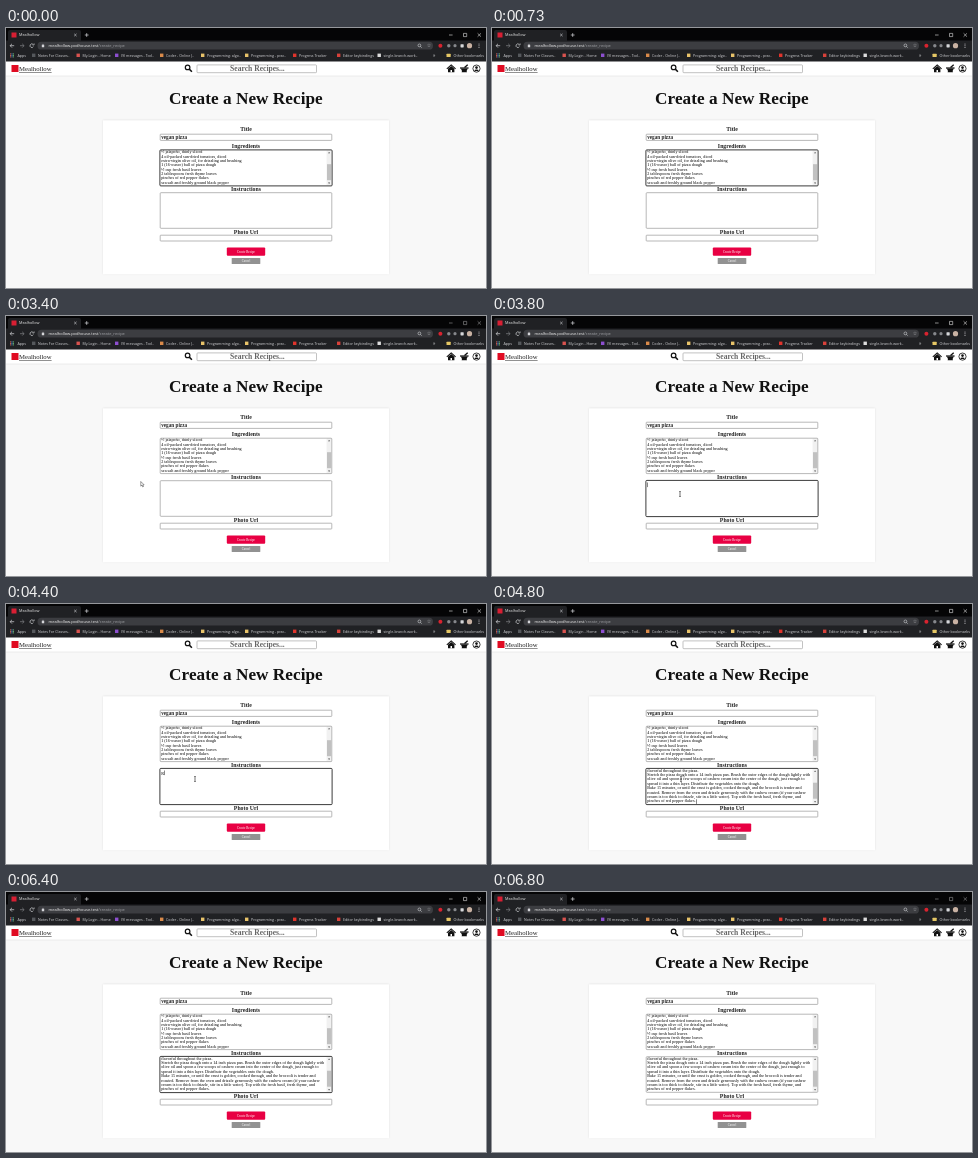
An HTML page with a canvas that plays this animation: 480x260 px, repeating every 8 s.

```html
<!DOCTYPE html>
<html lang="en">
<head>
<meta charset="utf-8">
<title>Mealhollow</title>
<style>
html, body { margin: 0; width: 100%; height: 100%; overflow: hidden; background: #f8f8f8; }
canvas { display: block; width: 480px; height: 260px; }
</style>
</head>
<body>
<canvas id="stage" width="480" height="260"></canvas>
<script>
const ctx = document.getElementById('stage').getContext('2d');
const LOOP = 8000;
const SERIF = '"Liberation Serif", serif';
const SANS = '"Open Sans", sans-serif';
const LINE = 4.38;

const ingredients = [
  '½ jalapeño, thinly sliced',
  '4 oil-packed sun-dried tomatoes, diced',
  'extra-virgin olive oil, for drizzling and brushing',
  '1 (16-ounce) ball of pizza dough',
  '½ cup fresh basil leaves',
  '2 tablespoons fresh thyme leaves',
  'pinches of red pepper flakes',
  'sea salt and freshly ground black pepper'
];
const instructions = [
  'flavorful throughout the pizza.',
  'Stretch the pizza dough onto a 14 inch pizza pan. Brush the outer edges of the dough lightly with',
  'olive oil and spoon a few scoops of cashew cream into the center of the dough, just enough to',
  'spread it into a thin layer. Distribute the vegetables onto the dough.',
  'Bake 15 minutes, or until the crust is golden, cooked through, and the broccoli is tender and',
  'roasted. Remove from the oven and drizzle generously with the cashew cream (if your cashew',
  'cream is too thick to drizzle, stir in a little water). Top with the fresh basil, fresh thyme, and',
  'pinches of red pepper flakes.'
];
const bookmarks = [
  [32, 'Notes For Classes..', '#55585c'], [76.5, 'My.Login - Home', '#d9534f'],
  [115, '(9) messages - Tod..', '#8d4fd0'], [160, 'Coder - Online J..', '#d98a4a'],
  [201, 'Programming: algo..', '#e8c36a'], [245, 'Programming - prac..', '#e8c36a'],
  [293, 'Progress Tracker', '#e0342c'], [337, 'Editor keybindings', '#d8413a'],
  [377.5, 'single-branch-work..', '#dddddd']
];

// Pointer positions hold until the next entry: time, shape, x, y.
const pointer = [
  [0, ''], [70, 'arrow', 330, 221], [130, 'arrow', 460, 19], [200, ''],
  [3400, 'arrow', 134.8, 165.5], [3470, 'arrow', 146, 179], [3530, 'beam', 163, 192],
  [3600, 'beam', 176, 196], [3730, 'beam', 184, 186], [3800, 'beam', 188, 178],
  [3870, 'beam', 189, 175], [5200, 'beam', 198, 180], [5270, 'beam', 207, 185],
  [5330, 'beam', 196, 186], [5400, 'beam', 168, 180], [5470, 'arrow', 130.8, 176.8],
  [5530, 'arrow', 10, 205], [5600, '']
];

const within = (t, ...spans) => spans.some(([a, b]) => t >= a && t < b);

function rect(x, y, w, h, color) {
  ctx.fillStyle = color;
  ctx.fillRect(x, y, w, h);
}

function box(x, y, w, h, r, fill, stroke, width = 0.5) {
  ctx.beginPath();
  ctx.roundRect(x, y, w, h, r);
  if (fill) { ctx.fillStyle = fill; ctx.fill(); }
  if (stroke) { ctx.strokeStyle = stroke; ctx.lineWidth = width; ctx.stroke(); }
}

function dot(x, y, r, color) {
  ctx.beginPath();
  ctx.arc(x, y, r, 0, Math.PI * 2);
  ctx.fillStyle = color;
  ctx.fill();
}

function path(points, color, width, fill) {
  ctx.beginPath();
  for (let i = 0; i < points.length; i += 2) ctx.lineTo(points[i], points[i + 1]);
  if (fill) { ctx.closePath(); ctx.fillStyle = fill; ctx.fill(); }
  if (width) { ctx.strokeStyle = color; ctx.lineWidth = width; ctx.stroke(); }
}

function cross(x, y, r, color, width) {
  path([x - r, y - r, x + r, y + r], color, width);
  path([x + r, y - r, x - r, y + r], color, width);
}

// Laid out at ten times the size so that small glyphs keep exact advances.
function text(str, x, y, size, color, { font = SERIF, weight = 'normal', align = 'left' } = {}) {
  ctx.save();
  ctx.translate(x, y);
  ctx.scale(0.1, 0.1);
  ctx.font = `${weight} ${size * 10}px ${font}`;
  ctx.textAlign = align;
  ctx.fillStyle = color;
  ctx.fillText(str, 0, 0);
  const width = ctx.measureText(str).width / 10;
  ctx.restore();
  return width;
}

function ring(x, y, r, color, width, from = 0, to = Math.PI * 2) {
  ctx.beginPath();
  ctx.arc(x, y, r, from, to);
  ctx.strokeStyle = color;
  ctx.lineWidth = width;
  ctx.stroke();
}

function drawBrowser(active) {
  const ui = '#d6d7da', control = active ? '#e2e2e2' : '#929294';
  rect(0, 0, 480, 34, '#202124');
  rect(0, 0, 480, 12.5, '#050506');
  box(2, 2, 73, 12, [2, 2, 0, 0], '#202124');
  rect(5.5, 4.5, 5, 5, '#d81f33');
  text('Mealhollow', 13, 8.4, 3.8, '#ececec', { font: SANS });
  cross(69.4, 7, 1.2, ui, 0.6);
  path([78.8, 7, 82.6, 7], ui, 0.7);
  path([80.7, 5.1, 80.7, 8.9], ui, 0.7);

  path([443, 7, 446.6, 7], control, 0.6);
  box(457.5, 5.4, 3.2, 3.2, 0, null, control, 0.6);
  cross(473.3, 7, 1.7, control, 0.6);

  path([8.2, 17.7, 4.2, 17.7], ui, 0.7);
  path([6, 15.8, 4.1, 17.7, 6, 19.6], ui, 0.7);
  path([14, 17.7, 18, 17.7], '#808286', 0.7);
  path([16.2, 15.8, 18.1, 17.7, 16.2, 19.6], '#808286', 0.7);
  ring(25.8, 17.7, 1.8, ui, 0.7, 0.5, 5.6);
  path([26.5, 17, 28.1, 17, 28.1, 15.4], ui, 0.6);
  box(31.5, 13.8, 395.5, 7.8, 3.9, '#3c3d41');
  box(35.8, 17.1, 2.4, 2.2, 0.3, ui);
  ring(37, 17, 0.8, ui, 0.5, Math.PI, 0);
  const host = text('mealhollow.podhouse.test', 42.4, 19.1, 4.05, '#f0f0f0', { font: SANS });
  text('/create_recipe', 42.4 + host, 19.1, 4.05, '#a0a2a6', { font: SANS });
  ring(413.4, 17.4, 1.4, ui, 0.6);
  path([414.4, 18.4, 415.7, 19.7], ui, 0.6);
  text('☆', 423, 19.4, 5, ui, { font: '"DejaVu Sans", sans-serif', align: 'center' });
  dot(434.4, 17.7, 2, '#d8232f');
  dot(442.8, 17.7, 1.7, '#86888c');
  dot(449, 17.7, 1.6, '#86888c');
  box(454.5, 16.2, 3.2, 3.2, 0.6, ui);
  dot(463.5, 17.7, 2.6, '#c9b2a3');
  for (const y of [15.9, 17.7, 19.5]) dot(473, y, 0.5, ui);

  for (let i = 0; i < 9; i++) {
    rect(4 + (i % 3) * 1.5, 25.4 + Math.floor(i / 3) * 1.5, 1, 1, ['#d65b50', '#5a9be0', '#68b36b'][i % 3]);
  }
  text('Apps', 11.4, 28.8, 3.7, ui, { font: SANS });
  for (const [x, label, color] of bookmarks) {
    rect(x - 6, 25.6, 3.4, 3.4, color);
    text(label, x, 28.8, 3.6, ui, { font: SANS });
  }
  text('»', 427, 28.8, 4.8, ui, { font: SANS });
  box(440.5, 25.8, 4.2, 3.2, 0.5, '#e5c765');
  text('Other bookmarks', 447.6, 28.8, 3.7, ui, { font: SANS });
}

function drawNav() {
  rect(0, 33.5, 480, 14.5, '#fff');
  rect(0, 47.7, 480, 0.6, '#e2e2e2');
  rect(5.5, 37, 7, 7, '#e00b22');
  const width = text('Mealhollow', 13, 43, 6.75, '#222');
  rect(13, 44, width, 0.5, '#222');
  ring(181.6, 39.4, 2.3, '#111', 1.2);
  path([183.3, 41.1, 185.9, 43.7], '#111', 1.5);
  box(191, 36.9, 119.5, 7.8, 0.8, '#fff', '#999', 0.6);
  text('Search Recipes...', 251.4, 43, 7.6, '#666', { weight: 'bold', align: 'center' });

  path([440.8, 40.8, 445.2, 36.9, 449.6, 40.8], '#111', 1.1);
  path([442, 40.8, 445.2, 38, 448.4, 40.8, 448.4, 44.2, 442, 44.2], '', 0, '#111');
  rect(444.5, 42, 1.5, 2.3, '#fff');
  rect(454, 39.4, 8.6, 1.2, '#111');
  path([454.8, 40.6, 461.8, 40.6, 460.6, 43, 461, 44.3, 455.6, 44.3, 456, 43], '', 0, '#111');
  path([458.5, 39.6, 461.7, 36.7], '#111', 1.3);
  ring(470.5, 40.6, 3.6, '#111', 0.8);
  dot(470.5, 39.6, 1.3, '#111');
  ctx.beginPath();
  ctx.ellipse(470.5, 43, 2.2, 1.4, 0, Math.PI, 0);
  ctx.fillStyle = '#111';
  ctx.fill();
}

function drawArea(y, h, lines, focused, scrollbar) {
  box(154.2, y, 171.6, h, 0.8, '#fff');
  ctx.save();
  ctx.beginPath();
  ctx.rect(154.4, y, 171.2, h);
  ctx.clip();
  lines.forEach((line, i) => text(line, 155.2, y + 3 + i * LINE, 4.2, '#000'));
  if (scrollbar) {
    rect(320.6, y, 5, h, '#f1f1f1');
    rect(321, y + 14, 4.2, 16, '#c1c1c1');
    path([322, y + 3, 323.1, y + 1.7, 324.2, y + 3], '', 0, '#505050');
    path([322, y + h - 3, 323.1, y + h - 1.7, 324.2, y + h - 3], '', 0, '#505050');
  }
  ctx.restore();
  if (focused) box(153.9, y - 0.3, 172.2, h + 0.6, 0.9, null, '#181818', 0.85);
  else box(154.2, y, 171.6, h, 0.8, null, '#888', 0.6);
}

function drawForm(t, focusFirst, focusSecond) {
  const centered = { weight: 'bold', align: 'center' };
  text('Create a New Recipe', 239.9, 75.6, 17.28, '#111', centered);
  ctx.save();
  ctx.shadowColor = 'rgba(0,0,0,.1)';
  ctx.shadowBlur = 2;
  rect(97, 92.3, 286, 154, '#fff');
  ctx.restore();

  [['Title', 103], ['Ingredients', 120.4], ['Instructions', 162.9], ['Photo Url', 205.8]]
    .forEach(([label, y]) => text(label, 240, y, 5.8, '#222', centered));
  box(154.2, 106.2, 171.6, 6.2, 0.6, '#fff', '#888', 0.6);
  text('vegan pizza', 155.2, 110.9, 5.2, '#222', { weight: 'bold' });
  box(154.2, 207.2, 171.6, 5.8, 0.6, '#fff', '#888', 0.6);

  const pasted = t >= 4800;
  drawArea(122.2, 35.4, ingredients, focusFirst, true);
  drawArea(164.7, 35.6, pasted ? instructions : [], focusSecond, pasted);
  if (within(t, [4400, 4800])) text('R', 155.2, 170.6, 4.2, '#000');

  box(220.8, 219.5, 38.4, 8.2, 1, '#e80043');
  text('Create Recipe', 240, 224.6, 3.2, '#fff', { align: 'center' });
  box(225.7, 230, 28.6, 6, 0.6, '#929292');
  text('Cancel', 240, 234, 3.1, '#fff', { align: 'center' });
}

function drawCarets(t) {
  if (within(t, [200, 730], [1270, 1470])) rect(223.3, 153, 0.5, 4.6, '#111');
  if (within(t, [3800, 4330])) rect(155.2, 166.5, 0.5, 4.6, '#111');
  if (within(t, [4400, 4800])) rect(158.2, 166.5, 0.5, 4.6, '#111');
  if (within(t, [4800, 5400], [5930, 6400])) rect(204, 195.3, 0.5, 4.6, '#111');
}

function drawPointer(t) {
  const [, shape, x, y] = pointer.findLast(p => p[0] <= t);
  if (shape === 'arrow') {
    ctx.save();
    ctx.translate(x, y);
    path([0, 0, 0, 4.7, 1.1, 3.7, 1.9, 5.4, 2.7, 5, 1.9, 3.4, 3.3, 3.3, 0, 0], '#333', 0.5, '#fff');
    ctx.restore();
  } else if (shape === 'beam') {
    path([x, y - 2.4, x, y + 2.4], '#111', 0.6);
    for (const end of [-2.5, 2.5]) path([x - 0.9, y + end, x + 0.9, y + end], '#111', 0.5);
  }
}

function draw(t) {
  const focusFirst = t < 1470;
  const focusSecond = within(t, [3800, 6730]);
  rect(0, 0, 480, 260, '#f8f8f8');
  drawBrowser(focusFirst || focusSecond);
  drawNav();
  drawForm(t, focusFirst, focusSecond);
  drawCarets(t);
  drawPointer(t);
}

const start = performance.now();
function tick() {
  draw((performance.now() - start) % LOOP);
  requestAnimationFrame(tick);
}
tick();
</script>
</body>
</html>
```
